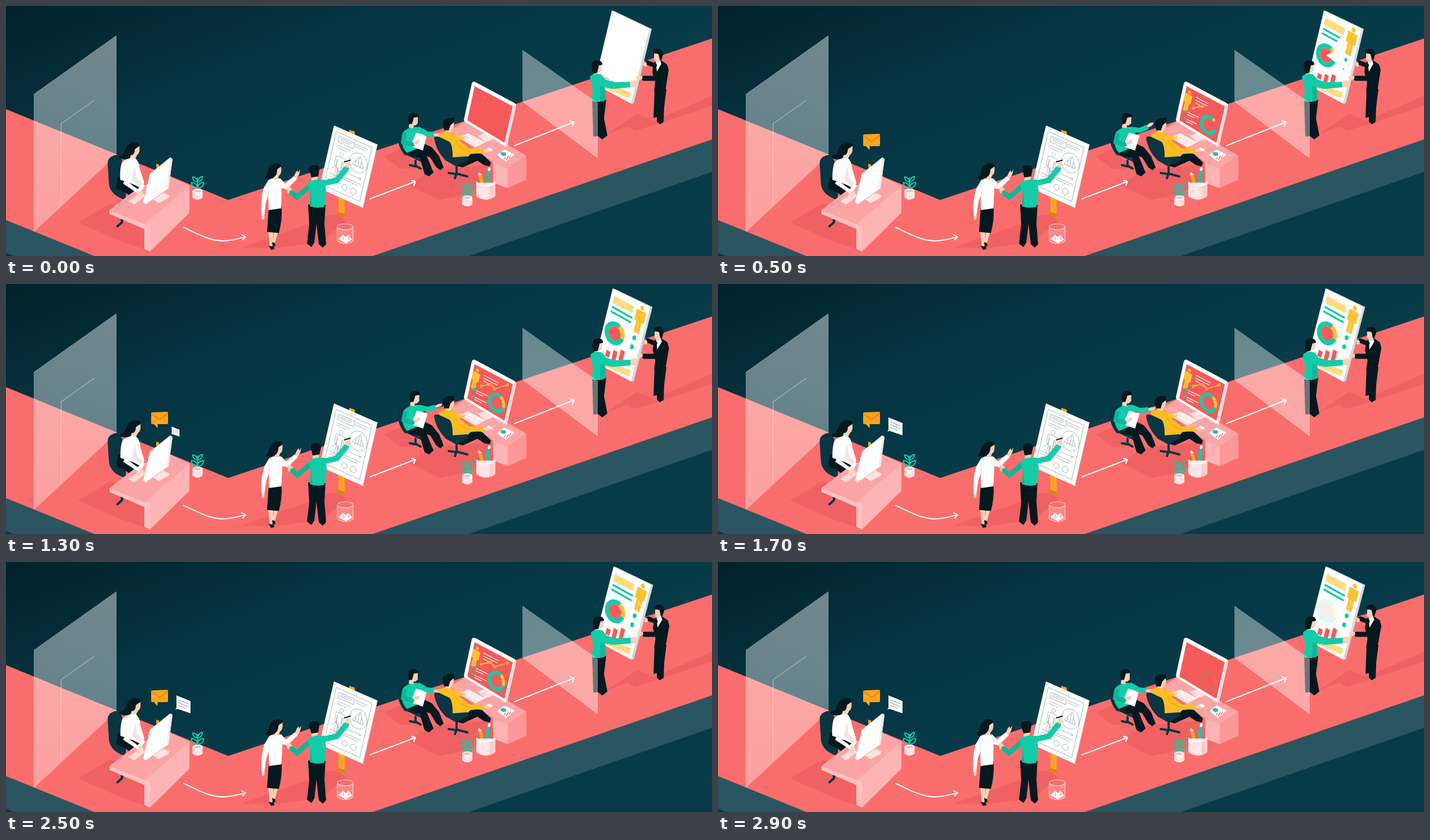
An HTML page with a canvas that plays this animation: 1255x446 px, repeating every 3000 ms.

```html
<!DOCTYPE html>
<html lang="en">
<head>
<meta charset="utf-8">
<title>Design process</title>
<style>
html, body { margin: 0; width: 100%; height: 100%; overflow: hidden; background: #053440; }
canvas { display: block; width: 100%; height: 100%; }
</style>
</head>
<body>
<canvas id="stage" width="1255" height="446"></canvas>
<script>
const ctx = document.getElementById('stage').getContext('2d');
const LOOP = 3000;
const TEAL = '#14cba8', TEAL2 = '#0fb697', INK = '#03191f', CHAIR = '#0a3542', SKIN = '#ffd0b4',
  GOLD = '#fcc234', PALE = '#ffdb80', ORANGE = '#f9a51f', RED = '#f55a5a', WHITE = '#fff',
  SHADE = 'rgba(200,45,60,.2)';

const fill = (c, d) => { ctx.fillStyle = c; ctx.fill(new Path2D(d)); };
const line = (c, w, d) => {
  ctx.strokeStyle = c; ctx.lineWidth = w; ctx.lineCap = ctx.lineJoin = 'round';
  ctx.stroke(new Path2D(d));
};
const oval = (c, x, y, rx, ry = rx, rot = 0) => {
  ctx.fillStyle = c; ctx.beginPath(); ctx.ellipse(x, y, rx, ry, rot, 0, 7); ctx.fill();
};
const group = fn => { ctx.save(); fn(); ctx.restore(); };
const seg = (t, a, b) => Math.min(1, Math.max(0, (t - a) / (b - a)));
const ease = x => (1 - Math.cos(Math.PI * x)) / 2;
const out = x => 1 - (1 - x) * (1 - x);
const hold = (t, a, b, c, d) => ease(seg(t, a, b)) * (1 - ease(seg(t, c, d)));

// Shift the top by dx while the base stays put
const lean = (dx, base, top, fn) => group(() => {
  const k = dx / (base - top);
  ctx.transform(1, 0, -k, 1, k * base, 0);
  fn();
});
// Isometric wall plane
const wall = (x, y, fn, s = 1) => group(() => {
  ctx.transform(.87 * s, .47 * s, -.23 * s, .97 * s, x, y);
  fn();
});
const grow = (c, w, x1, y1, x2, y2, p) => {
  if (p > 0) line(c, w, `M${x1},${y1}L${x1 + (x2 - x1) * p},${y1 + (y2 - y1) * p}`);
};

const BODY = 'M-9,6H9V25H6V12H5V46H1V27H-1V46H-5V12H-6V25H-9Z';
function person(x, y, s) {
  wall(x, y, () => {
    oval(GOLD, 0, 0, 4);
    fill(GOLD, BODY);
    line(GOLD, 1.4, BODY);
  }, s);
}

function donut(x, y, r, hole, sweep, core) {
  if (sweep <= 0) return;
  wall(x, y, () => {
    const a0 = .15, end = a0 + sweep * Math.PI * 2, split = a0 + 4.95;
    const band = (c, a, b) => {
      if (b <= a) return;
      ctx.fillStyle = c; ctx.beginPath();
      ctx.arc(0, 0, r, a, b); ctx.arc(0, 0, hole, b, a, true); ctx.fill();
    };
    band(TEAL, a0, Math.min(end, split));
    band(GOLD, split, end);
    if (core) {
      ctx.fillStyle = core; ctx.beginPath(); ctx.moveTo(0, 0);
      ctx.arc(0, 0, hole, a0, end); ctx.fill();
    }
  });
}

function floor() {
  const g = ctx.createLinearGradient(0, 0, 170, 446);
  g.addColorStop(0, '#02222b'); g.addColorStop(.5, '#053340'); g.addColorStop(1, '#073b48');
  ctx.fillStyle = g; ctx.fillRect(0, 0, 1255, 446);
  fill('#2b5560', 'M0,382L157,446H14L0,440ZM1255,238L652,446H823L1255,296Z');
  fill('#f96e6d', 'M0,184L395,346 1255,58V238L652,446H157L0,382Z');
  fill(SHADE, 'M128,386L186,352 246,386V434L200,418Z');
  fill(SHADE, 'M418,431L542,387 560,374 592,372 604,384 562,420 480,432Z');
  fill(SHADE, 'M714,318L760,292 862,282 868,316 800,340 770,346Z');
  fill(SHADE, 'M1066,230L1122,192 1152,205 1255,160V178L1162,209 1118,223 1104,215Z');
  fill(SHADE, 'M672,268L700,256 740,290 700,290Z');
}

function leftPane() {
  const g = ctx.createLinearGradient(0, 53, 0, 402);
  g.addColorStop(0, 'rgba(255,255,255,.44)'); g.addColorStop(1, 'rgba(255,255,255,.34)');
  fill(g, 'M50,157L196,53V266L50,402Z');
  line('rgba(255,255,255,.3)', 1, 'M50,157L196,53V266L50,402Z');
  line('rgba(255,255,255,.38)', 1.5, 'M157,168L98,210V353');
}

function plant(x, y) {
  group(() => {
    ctx.translate(x, y);
    line(TEAL, 2, 'M0,0V-23M0,-5Q-10,-5 -11,-15Q-1,-15 0,-5Q10,-5 11,-15Q1,-15 0,-5M0,-16Q-8,-17 -9,-25Q-1,-25 0,-16Q8,-17 9,-26Q1,-25 0,-16');
    fill('#ffe4e4', 'M-9,0V12Q0,19 9,12V0Z');
    oval(WHITE, 0, 0, 9, 4);
    oval('#f7bcbc', 0, 0, 6, 2.4);
  });
}

function arrows() {
  line(WHITE, 2, 'M316,395C340,406 362,419 385,419C400,419 414,415 425,412M419,408L426,412 421,417');
  line(WHITE, 2, 'M647,344L728,313M721,311L728,313 725,320');
  line(WHITE, 2, 'M904,249L1010,207M1003,205L1010,207 1007,214');
}

// Speech bubbles fly out of the monitor
function popFrom(s, fn) {
  if (s > 0) group(() => {
    ctx.translate(284, 275); ctx.scale(s, s); ctx.translate(-284, -275);
    fn();
  });
}

function firstDesk(t) {
  const dx = 2 * hold(t, 100, 500, 2500, 2900);
  line(CHAIR, 4, 'M206,372V386L198,393M206,384L209,378');
  fill(CHAIR, 'M181,285Q178,267 201,265L218,300 212,346Q186,338 183,318Z');
  fill(INK, 'M199,304L232,316 248,330 224,342 212,332 196,326Z');
  lean(dx, 325, 245, () => {
    fill(WHITE, 'M206,279Q214,271 228,270Q237,277 238,291L246,316 238,324 226,318 203,310Q202,290 206,279Z');
    fill('#f3e3e4', 'M229,285L232,306 244,318 238,322 224,310Z');
    fill(SKIN, 'M226,250L237,249Q239,262 233,266L230,272 221,271 221,260Z');
    fill(INK, 'M213,254C216,243 231,240 237,246C239,252 232,251 229,256C229,263 226,266 222,266L219,272C211,275 201,274 200,268C203,265 207,268 209,262Z');
  });
  fill('#fca4a5', 'M184,364L229,329 283,300 326,320 246,389Z');
  fill('#ffc0c0', 'M184,364L246,389V398L184,371Z');
  fill('#fdb3b3', 'M246,389L326,320V369L256,438 246,433Z');
  fill('#ffc2c2', 'M246,389L256,392V438L246,433Z');
  fill('#ffdcdc', 'M217,348L238,334 249,338 228,354Z');
  const tap = .7 * Math.sin(t / 70);
  fill(WHITE, 'M212,310L234,327 243,317 247,320 237,336 208,317Z');
  oval(SKIN, 240, 333 + tap, 5, 3, .6);
  oval(SKIN, 235, 338 - tap, 4, 2.5, .6);
  fill(ORANGE, 'M267,281L272,283V290L267,288Z');

  popFrom(out(seg(t, 50, 480)), () => {
    fill(ORANGE, 'M258,231Q258,229 260,229L286,228Q288,228 288,231V248Q288,250 286,250H270L269,257 263,250H260Q258,250 258,248Z');
    fill('#e58a13', 'M259,230L273,240 287,230V233L273,243 259,233Z');
    line('#e58a13', .8, 'M259,249L269,240M287,249L277,240');
  });
  popFrom(out(seg(t, 1150, 1600)), () => {
    fill(WHITE, 'M303,238L328,248V270L305,262 301,263 303,260Z');
    line('#aeb9bb', 1.5, 'M307,246L324,253M307,251L324,258M307,256L319,261');
  });

  fill('#ffe3e3', 'M262,345L280,333 290,338 289,342 271,352Z');
  fill(WHITE, 'M292,270L296,273 289,325 248,354 244,350 256,299Z');
  fill('#f0e8ea', 'M292,270L296,273 289,325 286,324Z');
  plant(340.5, 330);
}

function easel() {
  fill(ORANGE, 'M610,221L620,224V232H610ZM591,338L602,343V377L584,372 591,368Z');
  fill('#db8412', 'M584,372L591,367 602,371V377Z');
  fill(WHITE, 'M583,213L660,247 634,360 557,325Z');
  line('#dfe3e4', 1.2, 'M660,247L634,360');
  group(() => {
    ctx.transform(.9, .41, -.22, .975, 583, 213);
    const pen = d => line('#9aa6a9', .8, d);
    pen('M7,8H77V107H7Z');
    pen('M14,14H44V24H14ZM17,17H40M17,20H36M14,30H40M14,34H34');
    group(() => { ctx.translate(25, 43); ctx.scale(.9, .9); pen(BODY); pen('M4,0A4,4 0 1 1 -4,0A4,4 0 1 1 4,0'); });
    pen('M76,44A17,17 0 1 1 42,44A17,17 0 1 1 76,44M48,50L60,31 70,50ZM54,50V42M59,50V35M64,50V41');
    pen('M46,15H70M46,19H66M46,69H70M67,67L70,69 67,71M14,72L20,66 26,74 34,67');
    pen('M12,82H34M12,87H30M12,92H34M40,78H72M40,82H66');
    pen('M49,95A5,5 0 1 1 39,95A5,5 0 1 1 49,95M67,95A5.5,5.5 0 1 1 56,95A5.5,5.5 0 1 1 67,95');
  });
}

function standingPair(t) {
  easel();
  // woman
  fill(SKIN, 'M466,400L475,404 474,431 469,430ZM477,402L484,402 477,426 473,424Z');
  fill(INK, 'M467,428L476,429 477,434 471,435ZM473,421L478,423 479,428 474,429Z');
  fill(INK, 'M467,360L490,358Q491,384 485,405L464,403Z');
  lean(2.5 * hold(t, 100, 500, 2500, 2900), 382, 280, () => {
    oval(SKIN, 457, 377, 2.5, 4.5);
    fill(SKIN, 'M511,306L515,297 518,293 519,297 523,292 521,301 516,309Z');
    fill(WHITE, 'M466,311Q474,305 488,308L496,317 511,304 517,309 499,327 490,325 489,361 467,364 466,338 462,350 459,375 454,374Q451,350 458,325Z');
    line('#e3dcde', 1, 'M466,321L467,342M490,318L489,330');
    fill(SKIN, 'M480,287L489,286Q491,299 485,303L483,309 476,309 475,298Z');
    fill(INK, 'M466,293C469,281 484,277 489,284C491,288 484,288 482,292C482,300 479,305 474,306C466,312 459,310 460,304C465,303 464,298 466,293Z');
  });
  // man
  fill(INK, 'M537,354L568,355 566,388 569,425 563,431 556,425 552,388 548,422 543,430 535,424 539,390Z');
  const dx = 3 * hold(t, 100, 700, 1900, 2400);
  lean(dx, 362, 285, () => {
    fill(SKIN, 'M499,324L504,322 510,329 506,336 500,333Z');
    line(TEAL2, 9, 'M541,320L517,341 508,333');
    fill(SKIN, 'M543,300H554V312H543Z');
    fill(TEAL, 'M536,315Q548,308 566,310L569,330 566,358Q552,362 540,357L541,338Z');
    fill(TEAL2, 'M541,330L545,358 540,357Z');
    fill(INK, 'M539,292Q538,283 548,284Q558,283 557,292L555,304 543,306Z');
  });
  line(TEAL, 10, `M${561 + dx * .6},317L588,311 605,290`);
  fill(SKIN, 'M602,286L605,279 611,278 612,284 608,289Z');
  line(INK, 2, 'M602,278L612,275');
  // waste bin
  fill('rgba(255,255,255,.18)', 'M589,394V419Q603,429 617,419V394Q603,402 589,394Z');
  fill(WHITE, 'M591,416L599,408 604,412 609,408 615,417 604,423Z');
  fill('#f4c6c8', 'M599,408L602,416 598,420ZM609,408L607,416 613,418Z');
  line('rgba(255,255,255,.65)', 1.2, 'M589,394A14,5.5 0 1 1 617,394A14,5.5 0 1 1 589,394V419Q603,429 617,419V394');
}

function screen(t) {
  fill(WHITE, 'M832,135Q829,135 828,138L814,202Q814,206 817,207L887,250Q890,252 891,248L907,178Q907,175 904,173L835,136Z');
  fill('#e9d9dc', 'M907,178L891,248 889,251 887,249 903,176Z');
  fill(RED, 'M833,143L901,179 886,244 820,204Z');
  oval(WHITE, 851.5, 163, .8);
  const p = out(seg(t, 50, 800));
  if (t < 60) return;
  group(() => {
    ctx.globalAlpha = 1 - seg(t, 2500, 2800);
    group(() => { ctx.globalAlpha *= seg(t, 60, 250); person(838, 154, .74); });
    [[850, 163, 875, 176], [849, 168, 873, 180], [849, 173, 858, 178], [836, 190, 857, 200],
     [835, 194, 848, 200], [833, 202, 854, 212], [833, 206, 845, 212]]
      .forEach(l => grow(WHITE, 1.2, ...l, p));
    oval(TEAL, 833, 188, 2.4 * p, 2.8 * p);
    oval(TEAL, 829.5, 200, 2.4 * p, 2.8 * p);
    const nodes = [[845, 182], [861, 179], [869, 187], [891, 180]];
    const q = seg(t, 150, 1100) * 3;
    nodes.forEach(([x, y], i) => {
      if (i < 3) grow(GOLD, 1.8, x, y, ...nodes[i + 1], Math.min(1, Math.max(0, q - i)));
      if (q >= i && q > 0) { oval(GOLD, x, y, 2.6); oval(RED, x, y, 1.1); }
    });
  });
  group(() => {
    ctx.globalAlpha = 1 - .9 * seg(t, 2500, 2900);
    donut(872, 212, 17, 11, out(seg(t, 50, 800)));
  });
}

const REACH = [[0, 768, 230], [100, 768, 230], [500, 768, 212], [900, 765, 202], [1300, 769, 217],
  [1700, 771, 223], [2400, 768, 230], [3000, 768, 230]];
function reach(t) {
  const i = Math.max(1, REACH.findIndex(k => k[0] > t));
  const [t0, x0, y0] = REACH[i - 1], [t1, x1, y1] = REACH[i];
  const e = ease(seg(t, t0, t1));
  return [x0 + (x1 - x0) * e, y0 + (y1 - y0) * e];
}

function secondDesk(t) {
  fill('#fca5a6', 'M789,222L818,205 925,267 892,290 866,279Z');
  fill('#fdb3b3', 'M866,279L892,290V325L866,315Z');
  fill('#fb9799', 'M892,290L925,267V310L892,325Z');
  screen(t);
  fill('#ffe0e0', 'M838,231L852,227 866,238 852,243Z');
  fill('#fff0f0', 'M803,235L821,227 852,243 835,252Z');
  line('#f9c4c6', .8, 'M808,235L839,249M814,232L844,246');
  fill(WHITE, 'M873,266L886,256 904,265 889,278Z');
  oval(TEAL, 884, 264, 5, 3.4, .3);
  fill(RED, 'M884,264L888,261 889,265Z');
  line(RED, 1.4, 'M886,272L888,270M890,274L893,268M894,272L897,267');

  // seated man in green
  fill(CHAIR, 'M697,226Q701,213 713,218L718,260 710,267Q694,250 697,226Z');
  line(CHAIR, 4, 'M708,262L738,276M728,276V286L718,284M728,285L737,290');
  fill(INK, 'M713,256L744,246 757,252 770,268 778,288 772,293 765,288 754,270 748,268 760,297 752,304 744,300 736,272 716,266Z');
  lean(3 * hold(t, 100, 500, 1900, 2400), 265, 193, () => {
    fill(TEAL, 'M705,226Q716,214 732,216L741,223 737,252 713,262Q700,250 705,226Z');
    fill(SKIN, 'M720,197L732,197V209Q729,214 725,213L724,218 716,217 717,206Z');
    fill(INK, 'M715,203Q713,191 724,191Q733,191 733,198L725,199 722,210 716,211Z');
    fill(WHITE, 'M729,226L748,231 741,258 719,250Z');
    line(TEAL2, 8, 'M708,230L706,243 722,247');
    oval(SKIN, 730, 243, 6, 3.5, -.5);
    const [x, y] = reach(t);
    const ey = 218 + .35 * (y - 201);
    const a = Math.atan2(y - ey, x - 750);
    line(TEAL, 9, `M734,220L748,${ey} ${x - 10 * Math.cos(a)},${y - 10 * Math.sin(a)}`);
    oval(SKIN, x - 2, y, 6, 3, a);
    line(SKIN, 2, `M${x},${y}L${x + 3},${y - 3}`);
  });

  // seated man in yellow
  fill(INK, 'M795,270L822,261 846,264 862,279 860,286 850,284 838,276 812,288 796,284Z');
  lean(Math.sin(t / 480) * .6, 275, 200, () => {
    line(GOLD, 7, 'M794,231L806,236 813,234');
    fill('#fbbd24', 'M769,229Q778,222 793,225L806,240 824,254 850,255 851,262 826,264 820,270 798,276 780,258Z');
    line('#e5a214', 1.2, 'M799,240L808,252 824,260');
    fill(SKIN, 'M785,208L796,206Q798,218 792,221L790,226 781,224Z');
    fill(INK, 'M777,213Q774,201 788,200L796,199Q799,207 794,209L790,213 787,222 779,222Z');
    oval(SKIN, 812, 233, 4, 2.3, .2);
  });
  oval(WHITE, 860, 256, 5, 2.6, .3);
  oval(SKIN, 854, 258 + .5 * Math.sin(t / 90), 5, 2.6, .1);
  fill(CHAIR, 'M761,235Q763,231 771,234L788,242Q794,247 794,270L820,268 823,274 800,286 782,276Q764,258 761,235Z');
  line(CHAIR, 4, 'M801,284V300L787,298M801,299L820,304M801,299L798,307');

  // pencil pot
  line(ORANGE, 6, 'M843,303L847,320');
  fill('#ffe7c7', 'M839,302L840,296 846,301Z');
  line(TEAL, 6, 'M858,294L854,320');
  oval('#d7fff5', 859, 291, 2.5, 3.5, .3);
  line(RED, 3, 'M852,303L851,318');
  fill('#ffe5e5', 'M836,315V339Q853,352 870,339V315Z');
  fill('rgba(249,170,172,.4)', 'M859,321L870,315V339L859,345Z');
  ctx.strokeStyle = WHITE; ctx.lineWidth = 2.5;
  ctx.beginPath(); ctx.ellipse(853, 315, 16, 5.5, 0, 0, Math.PI); ctx.stroke();
  plant(820, 342);
}

function poster(t) {
  fill('#cfdcdb', 'M1077,8L1081,9 1148,41 1116,173 1112,175Z');
  fill(WHITE, 'M1077,8L1144,41 1111,174 1046,139Z');
  fill(PALE, 'M1062,137L1111,154 1108,165 1060,145Z');
  const p = out(seg(t, 50, 850));
  wall(1063, 126, () => {
    ctx.fillStyle = RED;
    [11, 17, 24].forEach((h, i) => {
      const b = Math.max(1.2, h * p);
      ctx.fillRect(2 + i * 13, 1 - b, 8, b);
    });
  });
  if (t < 60) return;
  group(() => {
    ctx.globalAlpha = seg(t, 60, 300);
    fill(PALE, 'M1080,21L1115,40 1112,52 1077,34Z');
    person(1130, 43, .98);
  });
  ctx.lineCap = 'butt';
  grow(TEAL, 3.4, 1077, 41, 1111, 60, p);
  grow(TEAL, 3.4, 1075, 49, 1109, 68, out(seg(t, 150, 900)));
  const d1 = out(seg(t, 200, 800)), d2 = out(seg(t, 400, 900));
  oval(TEAL, 1116, 96, 3.5 * d1, 4.2 * d1);
  oval(TEAL, 1112, 112, 3.5 * d2, 4.2 * d2);
  group(() => {
    ctx.globalAlpha = 1 - .88 * seg(t, 2500, 2900);
    donut(1081, 88, 20, 12, out(seg(t, 50, 800)), RED);
  });
}

function presenters(t) {
  const dx = 3 * ease(seg(t, 900, 1700));
  // man in suit
  fill(INK, 'M1153,148L1174,148 1170,180 1169,207 1162,211 1157,206 1157,198 1151,200Z');
  lean(dx * .7, 160, 80, () => {
    fill(INK, 'M1151,101L1163,96 1175,104 1178,114 1172,152 1152,153 1154,136 1149,118Z');
    fill(WHITE, 'M1155,99L1163,97 1165,103 1157,117Z');
    fill(SKIN, 'M1152,85L1163,84 1164,96 1159,102 1155,99 1152,96Z');
    fill(INK, 'M1150,83Q1150,76 1159,76Q1169,77 1168,87L1165,97 1162,96 1160,86Z');
    line(INK, 8, 'M1153,106L1140,101');
  });
  lean(dx, 175, 10, () => poster(t));
  lean(dx * .8, 180, 80, () => {
    line(INK, 9, 'M1171,112L1160,129 1134,129');
    oval(SKIN, 1126, 128, 5.5, 4);
    oval(SKIN, 1136, 104, 3, 4);
  });
  // man in green
  fill(INK, 'M1042,166L1067,167 1063,200 1069,231 1060,238 1052,232 1044,233Z');
  lean(dx, 172, 97, () => {
    fill(SKIN, 'M1046,106L1058,105 1059,116 1053,119 1052,124 1044,124Z');
    fill(INK, 'M1041,106Q1042,96 1051,97Q1060,97 1060,105L1054,106 1051,119 1043,121Z');
    fill(TEAL, 'M1038,126Q1044,119 1058,122L1066,131 1080,136 1110,135 1111,145 1078,148 1064,145 1066,168Q1052,174 1041,169L1043,150Z');
    fill(TEAL2, 'M1056,143L1064,145 1066,168 1056,170Z');
    fill(SKIN, 'M1109,135L1118,132 1122,138 1118,145 1110,145Z');
  });
  const g = ctx.createLinearGradient(918, 78, 1052, 272);
  g.addColorStop(0, 'rgba(255,255,255,.4)'); g.addColorStop(1, 'rgba(255,255,255,.4)');
  fill(g, 'M918,78L1052,173V272L918,171Z');
}

function draw(now) {
  const t = Math.floor((now % LOOP) / 100) * 100;
  floor();
  leftPane();
  arrows();
  firstDesk(t);
  standingPair(t);
  secondDesk(t);
  presenters(t);
}

let start;
function tick(now) {
  start ??= now;
  draw(now - start);
  requestAnimationFrame(tick);
}
draw(0);
requestAnimationFrame(tick);
</script>
</body>
</html>
```
